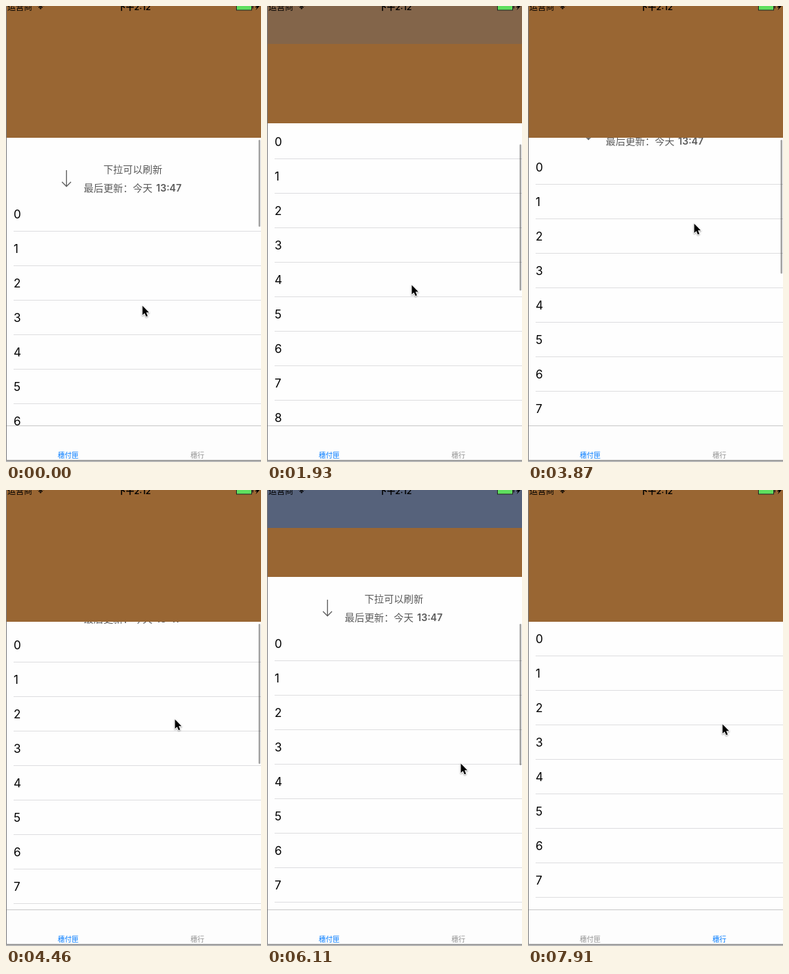
Animation of 369 by 661 pixels, one loop 8 s. Source, as an HTML page with a canvas:

```html
<!DOCTYPE html>
<html lang="zh">
<head>
<meta charset="utf-8">
<title>List with collapsing header</title>
<style>
  html, body { margin: 0; width: 100%; height: 100%; overflow: hidden; background: #fefefe; }
  canvas { display: block; width: 369px; height: 661px; }
</style>
</head>
<body>
<canvas id="stage"></canvas>
<script>
const W = 369, H = 661, LOOP = 8000, STEP = 149;
const REST = 191, NAV = 55, ROW = 50, TAB_TOP = 608;
const FADE_RANGE = 145;   // folding distance over which the bar turns blue
const LIST_LAG = 12;      // the list follows the header this many ms late
const TAB_SWITCH = 7420, BAR_HIDE = 6650;
const FONT = 'Inter, "Noto Sans CJK SC", "Noto Sans CJK", sans-serif';
const canvas = document.getElementById('stage');
const ctx = canvas.getContext('2d');
const dpr = window.devicePixelRatio || 1;
canvas.width = W * dpr;
canvas.height = H * dpr;

// Each gesture eases its changes in: cursor x and y, header fold, list pull.
const initial = { x: 197, y: 434, fold: 0, pull: 86 };
const gestures = [
  { at: 0, lasts: 1200, x: 9, y: -14, pull: -30 },
  { at: 1200, lasts: 270, pull: -56 },
  { at: 1728, lasts: 970, x: 28, y: -132, fold: 173 },
  { at: 3087, lasts: 330, x: 4, y: 16, fold: -173 },
  { at: 3700, lasts: 400, x: 6, y: 28, pull: 45 },
  { at: 4150, lasts: 450, pull: -45 },
  { at: 4600, lasts: 568, x: 10, y: -146, fold: 110 },
  { at: 5168, lasts: 190, x: 2, y: 46, fold: -45 },
  { at: 5600, lasts: 550, x: 24, y: 167, pull: 73 },
  { at: 6150, lasts: 400, x: 24, y: 167, pull: -73 },
  { at: 7010, lasts: 440, x: -25, y: 72 },
  { at: 7550, lasts: 345, x: 2, y: -299 }
];

function ease(p) {
  p = Math.min(1, Math.max(0, p));
  return p * p * (3 - 2 * p);
}

function valueAt(key, t) {
  return gestures.reduce(
    (sum, g) => sum + (g[key] || 0) * ease((t - g.at) / g.lasts), initial[key]);
}

function rect(color, x, y, w, h) {
  ctx.fillStyle = color;
  ctx.fillRect(x, y, w, h);
}

function text(str, x, y, size, color, weight = 400, align = 'center') {
  ctx.font = `${weight} ${size}px ${FONT}`;
  ctx.textAlign = align;
  ctx.textBaseline = 'alphabetic';
  ctx.fillStyle = color;
  ctx.fillText(str, x, y + size * 0.365);
}

function trace(points, x = 0, y = 0) {
  ctx.beginPath();
  points.forEach(([px, py]) => ctx.lineTo(x + px, y + py));
}

function drawRefresh(top) {
  const color = '#5a5a5a';
  text('下拉可以刷新', 183.5, top - 40.5, 14.2, color, 500);
  text('最后更新：今天', 112.5, top - 13.5, 14.2, color, 500, 'left');
  text('13:47', 254, top - 13.5, 14, color, 600, 'right');
  ctx.strokeStyle = color;
  ctx.lineWidth = 1.3;
  trace([[0, -12], [0, 11]], 87.5, top - 27);
  ctx.stroke();
  trace([[-6.5, 5], [0, 11.5], [6.5, 5]], 87.5, top - 27);
  ctx.stroke();
}

function drawList(top) {
  for (let y = top, i = 0; y < TAB_TOP; y += ROW, i++) {
    text(String(i), 11, y + 25, 17, '#000', 400, 'left');
    rect('#dedee0', 11, y + 49, W - 11, 1);
  }
}

function drawScrollBar(top) {
  const offset = REST - top;
  ctx.fillStyle = 'rgba(0,0,0,0.36)';
  ctx.beginPath();
  ctx.roundRect(365.5, 194 + 0.344 * Math.max(offset, 0), 2.5, 212 + Math.min(offset, 0), 1.25);
  ctx.fill();
}

function drawHeader(fold) {
  rect('#996633', 0, 0, W, Math.max(REST - Math.round(fold), NAV));
  rect(`rgba(3,93,212,${Math.min(1, fold / FADE_RANGE)})`, 0, 0, W, NAV);
}

function drawStatus() {
  text('运营商', 2, 1.5, 12, '#000', 400, 'left');
  text('下午2:12', 185.5, 1.5, 12, '#000', 600);
  ctx.strokeStyle = '#000';
  ctx.lineWidth = 1.3;
  for (const r of [4, 7]) {
    ctx.beginPath();
    ctx.arc(50, 5, r, -Math.PI * 0.75, -Math.PI * 0.25);
    ctx.stroke();
  }
  ctx.fillStyle = '#000';
  trace([[0, 5], [-1.8, 3], [0, 2.3], [1.8, 3]], 50);
  ctx.fill();
  rect('#222', 333, 0, 23, 6.5);
  rect('#5fdf5f', 334, 0, 21, 5.5);
  rect('#222', 356.5, 0, 1.5, 3.5);
  ctx.fillStyle = '#000';
  trace([[363, 0], [367, 0], [361.5, 6], [363, 2], [360, 2]]);
  ctx.fill();
}

function drawTabs(second) {
  const on = '#007aff', off = '#929292';
  rect('#fdfdfd', 0, TAB_TOP, W, H - TAB_TOP);
  rect('#c8c8c8', 0, TAB_TOP, W, 1);
  text('穗付匣', 90, 651, 10, second ? off : on);
  text('穗行', 277, 651, 10, second ? on : off);
}

function drawEdges() {
  rect('#77777a', 0, 0, 1, 659);
  rect('#8c8c8c', 0, 658, W, 1);
  rect('#b4b4b4', 0, 659, W, 2);
}

function drawCursor(x, y) {
  const arrow = [[0.5, 0.5], [0.5, 14], [3.6, 11.2], [5.8, 16.2], [8, 15.2], [5.9, 10.3], [10, 10.3]];
  ctx.save();
  ctx.shadowColor = 'rgba(0,0,0,0.35)';
  ctx.shadowBlur = 2 * dpr;
  ctx.shadowOffsetY = dpr;
  trace(arrow, x, y);
  ctx.closePath();
  ctx.lineJoin = 'round';
  ctx.lineWidth = 2;
  ctx.strokeStyle = '#fff';
  ctx.stroke();
  ctx.restore();
  ctx.fillStyle = '#000';
  ctx.fill();
}

function draw(time) {
  // The screen refreshes only once per STEP.
  const t = Math.floor((time % LOOP + 20) / (STEP + 0.2)) * STEP;
  const second = t >= TAB_SWITCH;
  const fold = second ? 0 : valueAt('fold', t);
  const top = second ? REST
    : Math.round(REST - valueAt('fold', t - LIST_LAG) + valueAt('pull', t));
  ctx.setTransform(dpr, 0, 0, dpr, 0, 0);
  rect('#fefefe', 0, 0, W, H);
  drawRefresh(top);
  drawList(top);
  if (t < BAR_HIDE) drawScrollBar(top);
  drawHeader(fold);
  drawStatus();
  drawTabs(second);
  drawEdges();
  drawCursor(Math.round(valueAt('x', t)), Math.round(valueAt('y', t)));
}

const start = performance.now();
function tick() {
  draw(performance.now() - start);
  requestAnimationFrame(tick);
}
tick();
</script>
</body>
</html>
```
